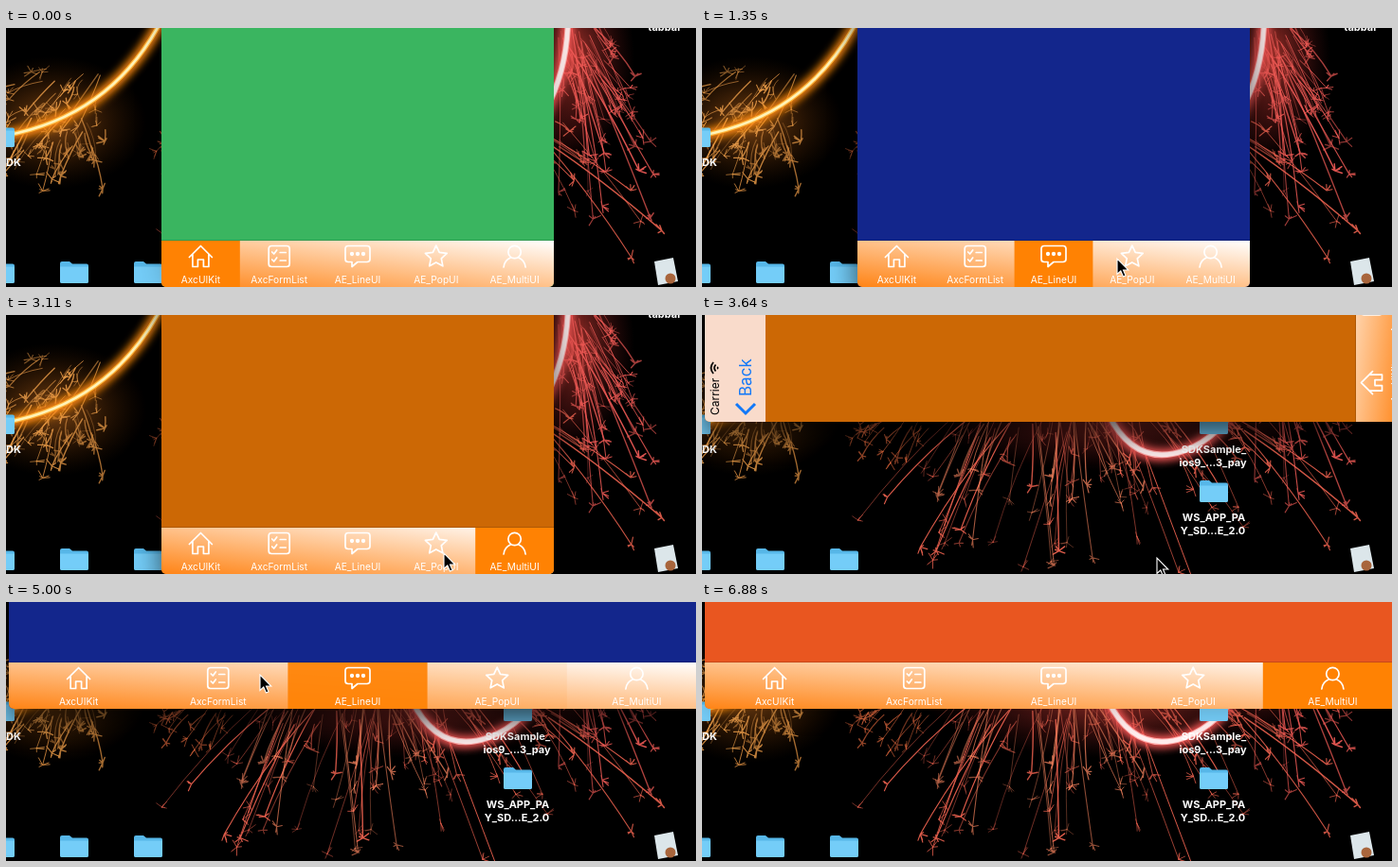
These frames come from a looping animation (728 px wide and 274 px high, 6.98 s). An HTML page:

```html
<!DOCTYPE html>
<html lang="en">
<head>
<meta charset="utf-8">
<title>Tab bar demo</title>
<style>
  html, body { margin: 0; width: 100%; height: 100%; overflow: hidden; background: #000; }
  svg { display: block; width: 728px; height: 274px; font-family: Inter, "Liberation Sans", sans-serif; }
  .icon { fill: none; stroke: #fff; stroke-width: 1.7; stroke-linejoin: round; stroke-linecap: round; }
  .tab { fill: #fff; font-size: 10.2px; text-anchor: middle; }
  .file { fill: #fff; font-size: 11px; font-weight: 700; text-anchor: middle; }
</style>
</head>
<body>
<svg viewBox="0 0 728 274">
  <defs>
    <linearGradient id="barFill" x1="0" y1="1" x2="1" y2="0">
      <stop offset="0" stop-color="#ff8416"/><stop offset="1" stop-color="#fff"/>
    </linearGradient>
    <radialGradient id="red">
      <stop offset="0" stop-color="#e0453c" stop-opacity=".75"/><stop offset="1" stop-color="#701818" stop-opacity="0"/>
    </radialGradient>
    <radialGradient id="gold">
      <stop offset="0" stop-color="#d87820" stop-opacity=".6"/><stop offset="1" stop-color="#602800" stop-opacity="0"/>
    </radialGradient>
    <filter id="soft" x="-30%" y="-30%" width="160%" height="160%"><feGaussianBlur stdDeviation="4"/></filter>
    <filter id="shade" x="-30%" y="-30%" width="160%" height="160%"><feGaussianBlur stdDeviation="15"/></filter>
    <clipPath id="screen"><rect id="screenRect" rx="5"/></clipPath>
    <g id="folder">
      <path d="M-15,-10 q0,-2 2,-2 h8 l3,2.500 h15 q2,0 2,2 V9 q0,2 -2,2 H-13 q-2,0 -2,-2z" fill="#57b7e8"/>
      <path d="M-15,-6.500 H15 V9 q0,2 -2,2 H-13 q-2,0 -2,-2z" fill="#74cdf8"/>
    </g>
  </defs>
  <g id="photo"></g>
  <g id="files"></g>
  <rect id="shadow" filter="url(#shade)"/>
  <g clip-path="url(#screen)"><g id="ui"></g></g>
  <path id="cursor" d="M0,0 V16.500 L3.800,13 L6.400,19 L9,17.900 L6.500,12 H11.800 Z" fill="#000" stroke="#fff" stroke-width="1.100"/>
</svg>
<script>
const LOOP = 6980, CENTER = [371, -94], BAR = 49, NAV = 64;
const NAMES = ['AxcUIKit', 'AxcFormList', 'AE_LineUI', 'AE_PopUI', 'AE_MultiUI'];
const COLORS = ['#3ab560', '#9c4a5a', '#13268c', '#cc6805', '#e95620'];
const FADE = 270, TURN = 3640, TURN_END = 3960, FOCUS = 400, BLUR = 6880;

// [time, tab index]
const TAPS = [[0, 0], [400, 1], [1000, 2], [1590, 3], [2420, 4], [3110, 3], [4780, 2], [5190, 1], [6050, 4]];

// [time, x, y] of the pointer tip
const POINTER = [
  [50, 309, 274], [220, 299, 258], [400, 299, 258], [760, 372, 252], [1060, 372, 252],
  [1350, 438, 244], [1590, 438, 244], [1890, 539, 250], [2420, 539, 250], [2690, 462, 252],
  [3110, 462, 252], [3340, 480, 257], [4140, 480, 257], [4610, 429, 77], [4780, 429, 77],
  [5000, 268, 77], [5130, 228, 84], [5530, 228, 84], [5960, 664, 82], [6040, 664, 82],
  [6160, 676, 225], [6320, 686, 282]
];

const $ = id => document.getElementById(id);
const mix = (a, b, k) => a + (b - a) * k;
const ease = k => { k = Math.min(1, Math.max(0, k)); return k * k * (3 - 2 * k); };
const set = (el, attrs) => { for (const key in attrs) el.setAttribute(key, attrs[key]); };

let seed = 11;
const rand = (a, b) => {
  seed = (seed * 16807) % 2147483647;
  return mix(a, b, seed / 2147483647);
};

// Glowing strands flying away from (cx, cy), each with a small spark at its tip
function fan(count, [x0, x1], [y0, y1], [cx, cy], [short, long], color) {
  let out = '';
  for (let i = 0; i < count; i++) {
    const x = rand(x0, x1), y = rand(y0, y1);
    const angle = Math.atan2(y - cy, x - cx) + rand(-.3, .3);
    const length = mix(short, long, rand(0, 1) ** 2);
    const ex = x + Math.cos(angle) * length, ey = y + Math.sin(angle) * length;
    let d = `M${x},${y}Q${(x + ex) / 2 + rand(-5, 5)},${(y + ey) / 2 - length * .06} ${ex},${ey}`;
    for (let r = 0; r < 5; r++) {
      const a = rand(0, 6.28), size = rand(3, 9);
      d += `M${ex},${ey}l${Math.cos(a) * size},${Math.sin(a) * size}`;
    }
    out += `<path d="${d}" stroke="${color}" stroke-width="${rand(.5, 1.5)}" opacity="${rand(.5, .95)}"/>`;
  }
  return out;
}

const glow = (cx, cy, rx, ry, fill) =>
  `<ellipse cx="${cx}" cy="${cy}" rx="${rx}" ry="${ry}" fill="url(#${fill})"/>`;

function trail(d, layers) {
  return layers.map(([color, width, blur]) =>
    `<path d="${d}" stroke="${color}" stroke-width="${width}"${blur ? ' filter="url(#soft)"' : ''}/>`).join('');
}

function drawPhoto() {
  $('photo').innerHTML = '<g fill="none" stroke-linecap="round">' +
    glow(50, 100, 100, 70, 'gold') + glow(430, 100, 200, 65, 'red') + glow(598, 30, 65, 110, 'red') +
    fan(45, [0, 105], [40, 130], [110, 10], [10, 75], '#e79a48') +
    fan(12, [40, 90], [85, 125], [60, 0], [20, 70], '#c8823c') +
    fan(14, [175, 240], [105, 122], [280, 40], [15, 50], '#d9653c') +
    fan(70, [260, 590], [95, 130], [400, -60], [18, 170], '#ef6350') +
    fan(22, [270, 420], [100, 120], [360, -40], [60, 165], '#f0805c') +
    fan(50, [582, 632], [-5, 60], [560, -100], [20, 190], '#ee5a55') +
    trail('M166,-12Q112,96 -8,115', [['#ff8a10', 12, 1], ['#ffb43c', 5], ['#fff3b8', 2.6]]) +
    trail('M593,-10C592,60 560,125 510,143C472,157 446,140 428,104',
      [['#ff5a58', 13, 1], ['#ffaaa8', 6.5], ['#ffecec', 4.5]]) + '</g>';
}

function drawFiles() {
  const folder = (x, y) => `<use href="#folder" x="${x}" y="${y}"/>`;
  const label = (x, y, text) => `<text class="file" x="${x}" y="${y}">${text}</text>`;
  $('files').innerHTML =
    folder(-6, 115) + folder(-6, 259) + folder(72, 259) + folder(150, 259) + folder(540, 115) + folder(540, 187) +
    label(8, 146, 'DK') + label(695, 3, 'tabbar') +
    label(540, 146, 'SDKSample_') + label(539, 160, 'ios9_...3_pay') +
    label(540, 218, 'WS_APP_PA') + label(539, 232, 'Y_SD...E_2.0') +
    `<path d="M684,247 L704,243 L709,268 L688,272 Z" fill="#dce6ea"/>
     <circle cx="701" cy="265" r="5.500" fill="#a8653c"/>`;
}

function starPath() {
  const points = Array.from({ length: 10 }, (_, i) => {
    const r = i % 2 ? 5.8 : 12, a = (i * 36 - 90) * Math.PI / 180;
    return `${r * Math.cos(a)},${r * Math.sin(a) + .6}`;
  });
  return `<path d="M${points.join('L')}Z"/>`;
}

const dot = x => `<circle cx="${x}" cy="-2.500" r="1.300" fill="#fff"/>`;
const ICONS = [
  '<path d="M-12,1 L0,-11 L12,1 M-8.500,-2 V11 H-3 V3.500 H3 V11 H8.500 V-2"/>',
  '<rect x="-11" y="-11" width="22" height="22" rx="3"/><path d="M-7.500,-4.500 l2,2 l3,-4 M1,-4 H7 M-7.500,3.500 l2,2 l3,-4 M1,4.500 H7"/>',
  '<path d="M-10,-11 H10 q3,0 3,3 V3 q0,3 -3,3 H0 L-6,11 V6 H-10 q-3,0 -3,-3 V-8 q0,-3 3,-3z"/>' + [-6, 0, 6].map(dot).join(''),
  starPath(),
  '<circle cy="-4.500" r="6.700"/><path d="M-11.500,11.500 C-11,5 -7,2.500 -4,1.200 M11.500,11.500 C11,5 7,2.500 4,1.200"/>'
];

function drawUi() {
  $('ui').innerHTML = `
    <rect id="page"/>
    <g id="nav">
      <rect id="navFill" height="${NAV}" fill="#f9dbcb"/>
      <text x="7" y="15" font-size="12">Carrier</text>
      <g fill="none" stroke="#000" stroke-width="1.800">
        <path d="M51,9 q6,-5 12,0 M53.500,11.500 q3.500,-3 7,0 M56,14 q1,-1 2,0"/>
      </g>
      <path d="M19,33 L9,43 L19,53" fill="none" stroke="#1278f8" stroke-width="3"/>
      <text x="27" y="49" font-size="17" fill="#1278f8">Back</text>
    </g>
    <g id="bar">
      <rect id="barBase" height="${BAR}" fill="url(#barFill)"/>
      ${NAMES.map((name, i) => `<rect id="lit${i}" height="${BAR}" fill="#ff8203"/>`).join('')}
      <rect id="hairline" y="-.5" height=".5" opacity=".3"/>
      ${NAMES.map((name, i) => `<g id="tab${i}">
        <g class="icon" transform="translate(0,16.500)">${ICONS[i]}</g>
        <text class="tab" y="44.500">${name}</text></g>`).join('')}
    </g>`;
}

function placePointer(t) {
  const next = POINTER.findIndex(key => key[0] > t);
  $('cursor').style.display = next < 1 ? 'none' : '';
  if (next < 1) return;
  const [t0, x0, y0] = POINTER[next - 1], [t1, x1, y1] = POINTER[next];
  const k = ease((t - t0) / (t1 - t0));
  set($('cursor'), { transform: `translate(${mix(x0, x1, k)},${mix(y0, y1, k)})` });
}

function render(t) {
  const [cx, cy] = CENTER;

  // The device frame turns at once, its content follows
  const wide = t >= TURN;
  const frameW = wide ? 736 : 414, frameH = wide ? 414 : 736;
  const frame = { x: cx - frameW / 2, y: cy - frameH / 2, width: frameW, height: frameH };
  set($('screenRect'), frame);
  const active = t >= FOCUS && t < BLUR;
  set($('shadow'), { ...frame, y: frame.y + (active ? 14 : 0), opacity: active ? .65 : .2 });

  const turn = ease((t - TURN - 20) / (TURN_END - TURN - 20));
  const w = mix(414, 736, turn), h = mix(736, 414, turn);
  const angle = wide ? -90 * (1 - turn) : 0;
  set($('ui'), { transform: `translate(${cx},${cy}) rotate(${angle}) translate(${-w / 2},${-h / 2})` });

  const step = TAPS.filter(tap => tap[0] <= t).length - 1;
  const [start, tab] = TAPS[step];
  const previous = step ? TAPS[step - 1][1] : tab;
  const shown = step ? ease((t - start) / FADE) : 1;

  set($('page'), { width: w, height: h, fill: COLORS[tab] });
  set($('navFill'), { width: w });
  set($('bar'), { transform: `translate(0,${h - BAR})` });
  set($('barBase'), { width: w });
  set($('hairline'), { width: w });
  NAMES.forEach((_, i) => {
    const opacity = i === tab ? shown : i === previous ? 1 - shown : 0;
    set($('lit' + i), { x: i * w / 5, width: w / 5, opacity });
    set($('tab' + i), { transform: `translate(${(i + .5) * w / 5},0)` });
  });
  placePointer(t);
}

drawPhoto();
drawFiles();
drawUi();
const begin = performance.now();
function tick() {
  render((performance.now() - begin) % LOOP);
  requestAnimationFrame(tick);
}
tick();
</script>
</body>
</html>
```
